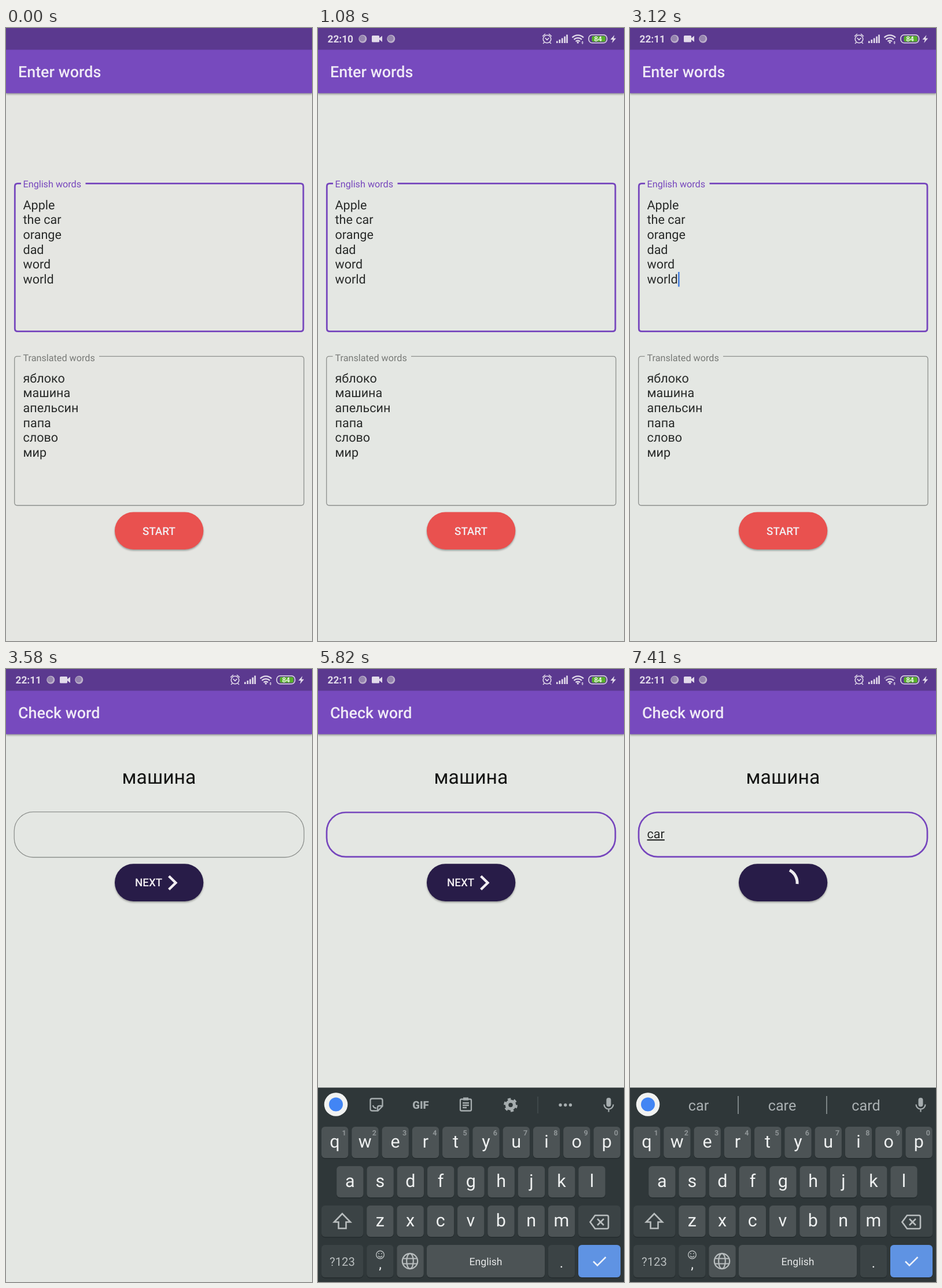
An HTML page for the animation above (8000 ms loop, 529 px wide and 1058 px high).

```html
<!DOCTYPE html>
<html lang="en">
<head>
<meta charset="utf-8">
<title>Word trainer</title>
<style>
  html, body { margin: 0; width: 100%; height: 100%; overflow: hidden; background: #e4e7e3; }
  svg { display: block; width: 100%; height: 100%; font-family: Roboto, sans-serif; text-rendering: geometricPrecision; }
  text { white-space: pre; }
  .mid { text-anchor: middle; }
  .title { font-size: 26.9px; font-weight: 500; fill: #efe9f6; }
  .body { font-size: 21.55px; fill: #282a29; }
  .label { font-size: 16.2px; }
  .button { font-size: 18.8px; font-weight: 500; fill: #f2eef2; }
  .hint { font-size: 12.5px; font-weight: 700; fill: #8f9597; }
  .letter { font-size: 30.5px; fill: #eef0f0; text-anchor: middle; }
  .suggest { font-size: 25.2px; fill: #abb1b3; text-anchor: middle; }
  .line { fill: none; stroke: currentColor; }
  .raised { filter: drop-shadow(0 2px 1.5px #0005); }
</style>
</head>
<body>
<svg viewBox="0 0 529 1058">
  <rect width="529" height="1058" fill="#e4e7e3"/>
  <rect data-on="0-70" width="529" height="1058" fill="#e5e6e2"/>

  <!-- app bar -->
  <g class="raised">
    <rect width="529" height="112.5" fill="#774abe"/>
  </g>
  <rect width="529" height="37.5" fill="#5b398f"/>
  <text class="title" data-on="0-3580" x="21" y="85">Enter words</text>
  <text class="title" data-on="3580-8000" x="21" y="85">Check word</text>

  <!-- status bar -->
  <g data-on="70-8000" fill="#e2dbea" color="#e2dbea">
    <g font-size="17.3" font-weight="700">
      <text data-on="70-1740" x="16.5" y="25">22:10</text>
      <text data-on="1740-8000" x="16.5" y="25">22:11</text>
    </g>
    <g id="dots"></g>
    <path d="M94.5 13h10q1.5 0 1.5 1.5v3l5-4v10.500l-5-4v3q0 1.500-1.500 1.500h-10q-1.500 0-1.500-1.500v-8.500q0-1.500 1.500-1.500z"/>
    <g class="line" stroke-width="1.6" stroke-linecap="round">
      <circle cx="396" cy="19" r="6.800"/>
      <path d="M393 17.500l3 3 3-3M388.500 14l4-3.500M403.500 14l-4-3.500M391 25l-1.500 1.500M401 25l1.500 1.500"/>
    </g>
    <path class="line" stroke-width="2.700" d="M413.300 26v-3.500M417.800 26v-6M422.200 26v-8.500M426.600 26v-11.500M430.500 26v-14.500"/>
    <g class="line" stroke-width="2.300">
      <path id="wifi" d="M439.500 16.500a13.500 13.500 0 0 1 19.500 0"/>
      <path d="M442.500 20a9.500 9.500 0 0 1 13.500 0M445.600 23.200a5 5 0 0 1 7.300 0"/>
    </g>
    <circle cx="449.200" cy="25" r="1.700"/>
    <path data-on="70-4040 4570-8000" d="M455.500 25l1.700-2.500 1.700 2.500z"/>
    <path d="M455.500 25.700h3.400l-1.700 2.300z"/>
    <rect class="line" x="468" y="11.700" width="31.500" height="14" rx="6" stroke-width="1.600"/>
    <rect x="473.500" y="13.700" width="23.500" height="10" rx="2.500" fill="#58b02c"/>
    <text class="mid" x="484" y="23" font-size="12" font-weight="500" fill="#fff">84</text>
    <path d="M512.500 12l-7 8h4.200l-1.500 6 7-8.300h-4.200z"/>
  </g>

  <!-- word entry screen -->
  <g data-on="0-3580">
    <path class="line" color="#7646bd" stroke-width="2.800" d="M26 268.400H20.300q-5 0-5 5V518.700q0 5 5 5H509q5 0 5-5V273.400q0-5-5-5H137.500"/>
    <path class="line" color="#8d908d" stroke-width="1.300" d="M25.500 566.700H19.700q-5 0-5 5V819q0 5 5 5H510q5 0 5-5V571.700q0-5-5-5H161"/>
    <text class="label" x="29.500" y="275.300" fill="#7646bd">English words</text>
    <text class="label" x="29.500" y="574.500" fill="#777976">Translated words</text>
    <g class="body" id="words"></g>
    <rect data-on="450-950 1740-2200 2790-3580" x="83" y="421" width="2.700" height="25.500" fill="#4a82dd"/>
    <rect class="raised" x="188" y="835.500" width="153.300" height="64.500" rx="32.200" fill="#e9514f"/>
    <text class="button mid" x="264.500" y="874.500">START</text>
  </g>

  <!-- word check screen -->
  <g data-on="3580-8000">
    <text class="mid" x="264.500" y="197.500" font-size="33.700" fill="#141514">машина</text>
    <path data-on="5160-5820" fill="#dde0dc" d="M228.500 246H516V326H223.500Q219.500 284 228.500 246z"/>
    <g class="line">
      <rect data-on="3580-5160" x="14.200" y="246.700" width="501" height="78.300" rx="33" stroke="#8f928f" stroke-width="1.300"/>
      <rect data-on="5160-5820" x="14.800" y="247.300" width="499.500" height="77" rx="33" stroke="#7048ab" stroke-width="2.300"/>
      <rect data-on="5820-8000" x="15" y="247.500" width="499" height="76.700" rx="33" stroke="#7646bd" stroke-width="2.700"/>
    </g>
    <rect data-on="5160-5820" x="30" y="274" width="2.500" height="21" fill="#5577cf"/>
    <g class="body" text-decoration="underline">
      <text data-on="6550-7410" x="29.500" y="292">ca</text>
      <text data-on="7410-8000" x="29.500" y="292">car</text>
    </g>
    <rect class="raised" x="188" y="336.300" width="153.300" height="64.700" rx="32.300" fill="#281c48"/>
    <g data-on="3580-7410">
      <text class="button" x="223" y="375.300">NEXT</text>
      <path class="line" color="#f2eef2" stroke-width="4.400" d="M281.600 357.500l11.800 11.500-11.800 11.500"/>
    </g>
    <path data-on="7410-8000" class="line" color="#eeecf0" stroke-width="5" d="M276 347.300A24.500 24.500 0 0 1 289 371"/>
  </g>

  <!-- keyboard -->
  <g data-on="5820-8000" color="#a6adaf">
    <rect y="722.500" width="529" height="336" fill="#2f3739"/>
    <circle cx="31" cy="751.500" r="20.300" fill="#f1f2f1"/>
    <circle cx="31" cy="751.500" r="12" fill="#4285f4"/>
    <g data-on="5820-6550">
      <g class="line" stroke-width="2.300">
        <path d="M93.500 741.500h15q3 0 3 3v10l-8 8h-10q-3 0-3-3v-15q0-3 3-3zM111 754h-5q-3 0-3 3v5M95 753q1 5 6 5"/>
        <path d="M248 742.500h15q2 0 2 2v16q0 2-2 2h-15q-2 0-2-2v-16q0-2 2-2zM250 749h11M250 753h11M250 757h7"/>
        <path d="M251 742h9" stroke-width="5"/>
        <circle cx="333" cy="752.500" r="6.500" stroke-width="5.500"/>
        <circle cx="333" cy="752.500" r="10.200" stroke-width="3.500" stroke-dasharray="5.340"/>
        <path d="M380 738v29" stroke="#485153" stroke-width="1.300"/>
      </g>
      <text class="mid" x="177.500" y="758.500" font-size="18.500" font-weight="900" fill="currentColor">GIF</text>
      <path class="line" stroke-width="5.400" stroke-linecap="round" d="M419 752.500h0M427.700 752.500h0M436.400 752.500h0"/>
    </g>
    <g data-on="6550-8000">
      <path class="line" stroke="#485153" stroke-width="1.300" d="M187 737v31M340 737v31"/>
      <g class="suggest" data-on="6550-7410"><text x="118.500" y="762">ca</text><text x="263" y="762">can</text><text x="408" y="762">case</text></g>
      <g class="suggest" data-on="7410-8000"><text x="118.500" y="762">car</text><text x="263" y="762">care</text><text x="408" y="762">card</text></g>
    </g>
    <rect x="498.500" y="740" width="8" height="15.500" rx="4" fill="currentColor"/>
    <path class="line" stroke-width="2.200" d="M494.500 751.500a8 8 0 0 0 16 0M502.500 759.500v5"/>

    <g id="keys"></g>
    <g class="line" color="#b9bebf" stroke-width="2.600">
      <path d="M42 940l-14 14.500h7.500v11h13v-11h7.500z"/>
      <path d="M479 943h20.500q2.500 0 2.500 2.500v18q0 2.500-2.500 2.500H479l-8.500-11.500zM483 949l11 11M494 949l-11 11"/>
      <g stroke-width="2.200">
        <circle cx="159" cy="1022" r="13.200"/>
        <ellipse cx="159" cy="1022" rx="5.800" ry="13.200"/>
        <path d="M147 1017.500h24M147 1026.500h24"/>
      </g>
      <g stroke-width="1.400">
        <circle cx="107.500" cy="1011" r="6.800"/>
        <path d="M104 1013q3.500 4 7 0M105 1008v2M110 1008v2"/>
      </g>
      <path stroke="#eef2fa" d="M476 1022.500l7 7 14.500-14.500"/>
    </g>
    <text class="mid" x="42" y="1029.500" font-size="20.300" fill="#b9bebf">?123</text>
    <text class="letter" x="107.500" y="1035" style="font-size:24px">,</text>
    <text class="letter" x="421" y="1033" style="font-size:24px">.</text>
    <text class="mid" x="290" y="1028.500" font-size="17.600" fill="#e6e8e8">English</text>
  </g>
</svg>
<script>
const LOOP = 8000, PITCH = 52.27, KEY = '#4c5355', DARK = '#3b4345';
const fill = (id, markup) => document.getElementById(id).innerHTML = markup;

const lines = (words, y) => words.split(' ').map((word, i) =>
  `<text x="29.5" y="${y + i * 25.6}">${word.replace('_', ' ')}</text>`).join('');
fill('words', lines('Apple the_car orange dad word world', 312.7) +
  lines('яблоко машина апельсин папа слово мир', 611.8));

fill('dots', [77.3, 126.3].map(x =>
  `<circle cx="${x}" cy="18.800" r="7" fill="#bdb2cb"/><circle cx="${x - .8}" cy="18" r="5.200" fill="#9584ae"/>`).join(''));

const key = (x, y, width = 46.3, color = KEY, height = 54) =>
  `<rect x="${x}" y="${y + 1.5}" width="${width}" height="${height}" rx="6" fill="#252c2e"/>
   <rect x="${x}" y="${y}" width="${width}" height="${height}" rx="6" fill="${color}"/>`;
const row = (letters, x0, y, hints = '') => [...letters].map((letter, i) => {
  const x = x0 + i * PITCH;
  const hint = hints && `<text class="hint mid" x="${x + 39}" y="805">${hints[i]}</text>`;
  return key(x, y) + `<text class="letter" x="${x + 23}" y="${y + 36}">${letter}</text>` + hint;
}).join('');
fill('keys',
  row('qwertyuiop', 6, 790, '1234567890') + row('asdfghjkl', 32.2, 858) + row('zxcvbnm', 84.2, 926) +
  key(6, 926, 72.3, DARK) + key(450, 926, 73, DARK) +
  key(6, 994, 72.3, DARK, 56) + key(84.2, 994, 46.3, DARK, 56) + key(136.4, 994, 46.3, KEY, 56) +
  key(188, 994, 204, KEY, 56) + key(397.8, 994, 46.3, DARK, 56) + key(450, 994, 73, '#5f93e3', 56));

// data-on lists the spans of time, in ms, during which a part is shown
const parts = [...document.querySelectorAll('[data-on]')].map(node =>
  ({ node, spans: node.dataset.on.split(' ').map(span => span.split('-').map(Number)) }));
const within = (time, spans) => spans.some(([from, to]) => time >= from && time < to);
const wifi = document.getElementById('wifi');
const origin = performance.now();

function draw() {
  const time = Math.max(0, performance.now() - origin) % LOOP;
  for (const { node, spans } of parts) node.style.display = within(time, spans) ? '' : 'none';
  wifi.style.opacity = within(time, [[2790, 3120], [6550, LOOP]]) ? .4 : 1;
  requestAnimationFrame(draw);
}
draw();
</script>
</body>
</html>
```
